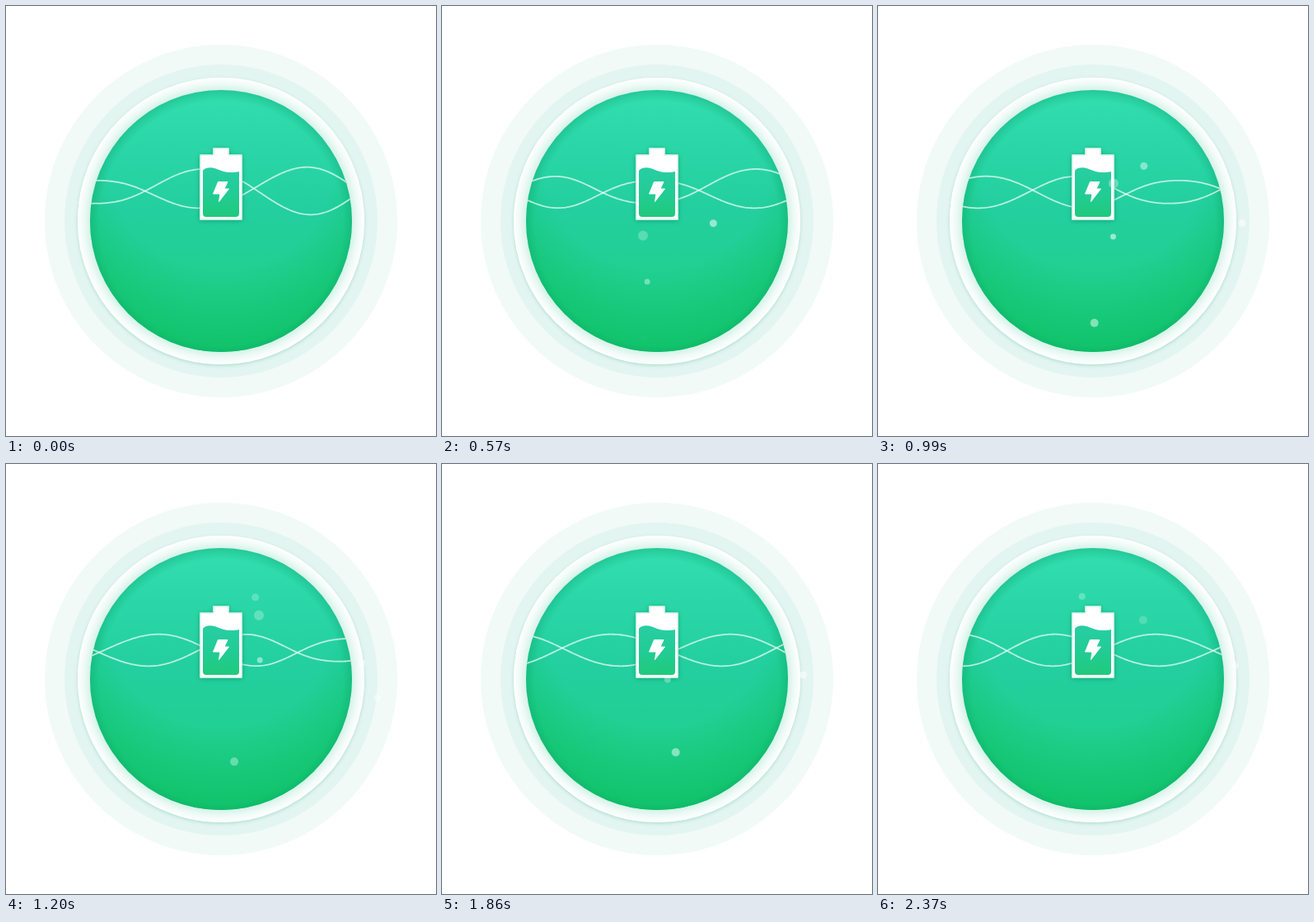
Animation, 522 px wide and 522 px high, one loop 2.4 s. Source, as an HTML page with a canvas:

```html
<!DOCTYPE html>
<html lang="en">
<head>
<meta charset="utf-8">
<title>Charging</title>
<style>
  html, body { margin: 0; width: 100%; height: 100%; overflow: hidden; background: #fff; }
  canvas { display: block; width: 522px; height: 522px; }
</style>
</head>
<body>
<canvas id="stage" width="522" height="522"></canvas>
<script>
const ctx = document.getElementById('stage').getContext('2d');
const LOOP = 2400, STEP = 30, CENTER = 261, RADIUS = 159, TAU = Math.PI * 2;

// Each bubble travels by (dx, dy) during its life; ease above 1 speeds up, sway bends the path
const bubbles = [
  { birth: 150, life: 1500, x: 202, y: 342, dx: 150, dy: -226, r: 6 },
  { birth: 0, life: 1400, x: 267, y: 389, dx: 11, dy: -257, r: 4.5, ease: .8, sway: 60 },
  { birth: 200, life: 1500, x: 232, y: 350, dx: 140, dy: -252, r: 3.5, ease: 2 },
  { birth: 560, life: 860, x: 245, y: 404, dx: 50, dy: -77, r: 5, ease: 2 },
  { birth: 1290, life: 1250, x: 260, y: 412, dx: 77, dy: -298, r: 5, ease: 2 },
  { birth: 1700, life: 800, x: 282, y: 293, dx: -41, dy: -158, r: 4 }
];
// Faint ones over the outer rings
for (let birth = 600; birth <= 1800; birth += 400)
  bubbles.push({ birth, life: 800, x: 460, y: 305, dx: -37, dy: -85, r: 4.5 });

function fillStops(gradient, ...stops) {
  stops.forEach(([at, color]) => gradient.addColorStop(at, color));
  return gradient;
}
const vertical = (y0, y1, ...stops) => fillStops(ctx.createLinearGradient(0, y0, 0, y1), ...stops);
const radial = (y, r0, r1, ...stops) => fillStops(ctx.createRadialGradient(CENTER, y, r0, CENTER, y, r1), ...stops);

function disc(x, y, r, fill) {
  ctx.beginPath();
  ctx.arc(x, y, r, 0, TAU);
  ctx.fillStyle = fill;
  ctx.fill();
}
const dial = (r, fill) => disc(CENTER, CENTER, r, fill);

function withShadow(color, blur, offsetY, paint) {
  ctx.save();
  ctx.shadowColor = color;
  ctx.shadowBlur = blur;
  ctx.shadowOffsetY = offsetY;
  paint();
  ctx.restore();
}

function drawDial() {
  ctx.fillStyle = '#fff';
  ctx.fillRect(0, 0, 522, 522);
  dial(214, '#f1faf7');
  dial(190, '#e3f5f0');
  withShadow('rgba(70,180,150,.35)', 4, 1.5, () => dial(174, '#fff'));
  dial(174, radial(CENTER, RADIUS, 174, [0, '#d5f2e8'], [.5, '#eefaf6'], [1, '#fff']));
  dial(RADIUS, vertical(102, 420, [0, '#33dfb0'], [.2, '#2bd7a8'], [.45, '#23cf9f'], [.75, '#20d090'], [1, '#1fcf88']));
  dial(RADIUS, radial(180, 140, 240, [0, 'rgba(17,194,106,0)'], [1, '#11c26a']));
  dial(RADIUS, radial(CENTER + 3, 148, 162, [0, 'rgba(0,150,95,0)'], [1, 'rgba(0,140,90,.28)']));
}

const bump = (u, at, width) => Math.exp(-(((u - at) / width) ** 2));

function strandY(u, sign) {
  const lobe = 1 + (360.5 - u + 8 * Math.cos(TAU * (u + 90) / 500)) / 122.5;
  const middle = 226 - 5 * bump(u, 270, 90);
  const swing = 19.3 + 9.5 * bump(u, 375, 160) - 6 * bump(u, 110, 60);
  return middle + sign * swing * Math.cos(Math.PI * lobe);
}

function drawStrands(t) {
  const drift = 3.3 - 3.5 * Math.cos(TAU * (t - 100) / 2700);
  ctx.save();
  ctx.beginPath();
  ctx.arc(CENTER, CENTER, RADIUS, 0, TAU);
  ctx.clip();
  ctx.strokeStyle = 'rgba(255,255,255,.68)';
  ctx.lineWidth = 1.8;
  for (const sign of [1, -1]) {
    ctx.beginPath();
    for (let x = 100; x <= 422; x += 2) ctx.lineTo(x, strandY(x - .251 * t - sign * drift, sign));
    ctx.stroke();
  }
  ctx.restore();
}

function drawBattery() {
  const shell = new Path2D('M237 180H251V174Q251 172 253 172H269Q271 172 271 174V180H285Q287 180 287 182V258Q287 260 285 260H237Q235 260 235 258V182Q235 180 237 180Z');
  withShadow('rgba(0,110,75,.4)', 6, 1, () => {
    ctx.fillStyle = '#fff';
    ctx.fill(shell);
  });
  ctx.save();
  ctx.clip(shell);
  ctx.strokeStyle = '#c4eedf';
  ctx.lineWidth = 3;
  ctx.stroke(shell);
  ctx.restore();

  ctx.fillStyle = vertical(196, 256, [0, '#27cea3'], [.5, '#22cc96'], [1, '#1fca7c']);
  ctx.fill(new Path2D('M239 200C241 196 248 195 255 197.5C263 201 270 203.5 283 201V252Q283 256 279 256H243Q239 256 239 252Z'));

  const bolt = new Path2D('M257.5 213.5H269L265 222H270.5L258.5 237.5L260 228H251.5Z');
  ctx.fillStyle = ctx.strokeStyle = '#fff';
  ctx.lineWidth = 1;
  ctx.lineJoin = 'round';
  ctx.fill(bolt);
  ctx.stroke(bolt);
}

function drawBubbles(t) {
  for (const { birth, life, x, y, dx, dy, r, ease = 1, sway = 0 } of bubbles) {
    const p = (t - birth) / life;
    if (p <= 0 || p >= 1) continue;
    const arch = Math.sin(Math.PI * p);
    const alpha = arch * Math.min(.55, 12 / r ** 2);
    disc(x + dx * p ** ((1 + ease) / 2) + sway * arch, y + dy * p ** ease, r, `rgba(255,255,255,${alpha})`);
  }
}

const start = performance.now();
function draw() {
  const t = Math.floor((performance.now() - start) % LOOP / STEP) * STEP;
  drawDial();
  drawStrands(t);
  drawBattery();
  drawBubbles(t);
  requestAnimationFrame(draw);
}
draw();
</script>
</body>
</html>
```
